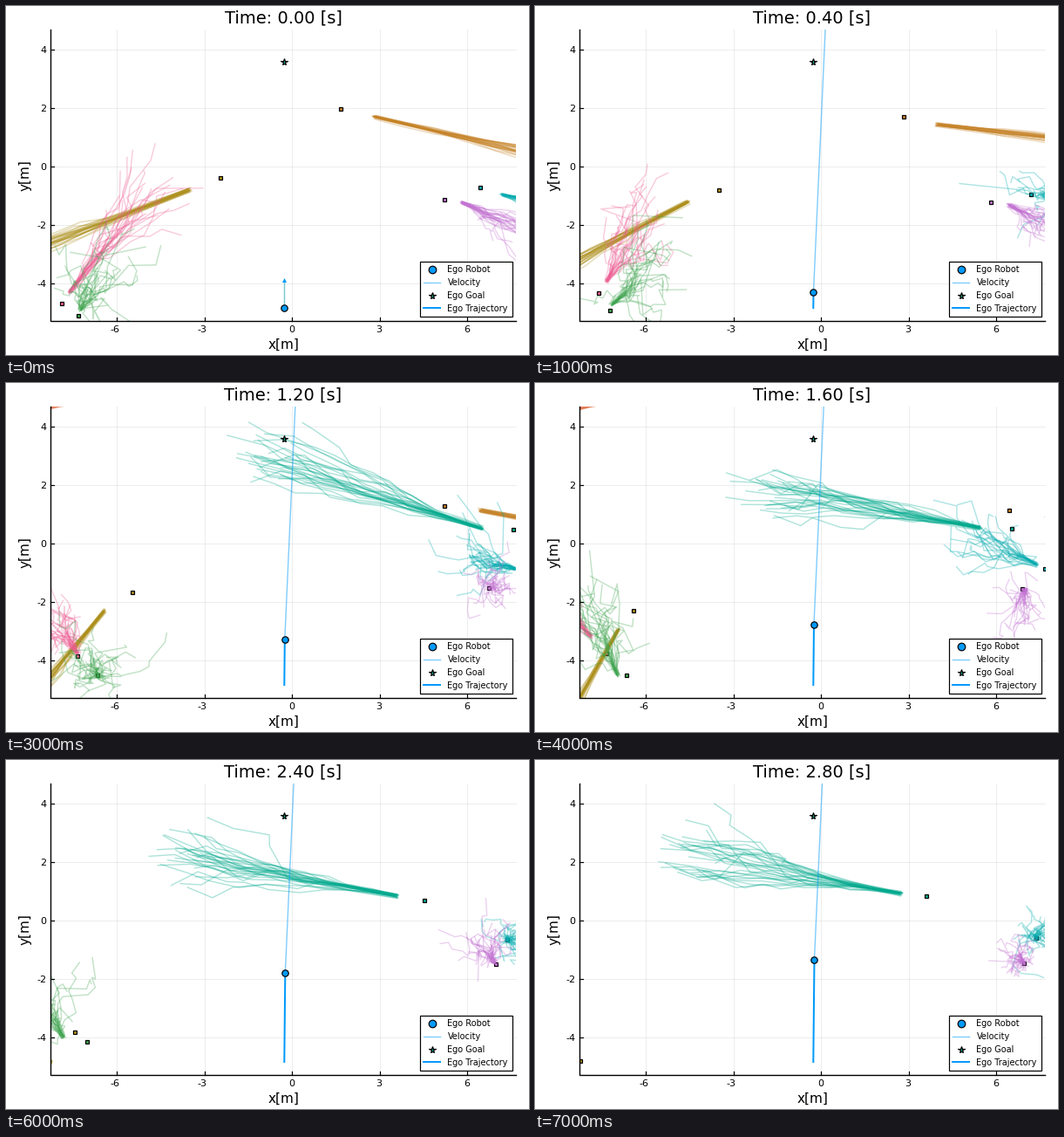
Write a matplotlib script that moves like this. It is 600 px wide and 400 px high and loops after 8000 ms.

```python
import numpy as np
import matplotlib.pyplot as plt
from matplotlib.animation import FuncAnimation
from matplotlib.collections import LineCollection
from matplotlib.patches import Rectangle

plt.rcParams["font.family"] = "DejaVu Sans"

W, H = 600, 400
LEFT, TOP, RIGHT, BOTTOM = 51, 27, 585, 361
SCALE = 33.5  # pixels per metre
STEPS = 8
HORIZON = 8   # how many steps ahead a cruising agent is predicted
KNOTS = 10
PX = 0.72     # points per pixel

BLUE, SALMON, GREEN, PURPLE = "#009afa", "#e36f47", "#3ea44e", "#c371d2"
OLIVE, CYAN, PINK, BROWN, TEAL = "#ac8e18", "#00aaae", "#ed5e93", "#c68225", "#00a98d"

rng = np.random.default_rng(7)
fig = plt.figure(figsize=(W / 100, H / 100), dpi=100, facecolor="white")
ax = fig.add_axes([0, 0, 1, 1])
ax.set_xlim(0, W)
ax.set_ylim(H, 0)
ax.axis("off")

window = Rectangle((LEFT, TOP), RIGHT - LEFT, BOTTOM - TOP, fc="none", ec="none")
ax.add_patch(window)
scenes = [[] for _ in range(STEPS)]


def line(xs, ys, color, width, z=1, **kw):
    return ax.plot(xs, ys, color=color, lw=width * PX, zorder=z, **kw)[0]


def label(x, y, text, size, ha="center"):
    return ax.text(x, y, text, size=size, ha=ha, va="baseline", zorder=12)


def marker(x, y, shape, size, face, z):
    return ax.plot([x], [y], shape, ms=size * PX, mfc=face, mec="black",
                   mew=1.2 * PX, zorder=z)[0]


def put(step, artist):
    """Show an artist inside the plot window during one step only."""
    artist.set_clip_path(window)
    artist.set_visible(False)
    scenes[step].append(artist)


def glide(keys, k):
    """Linear motion between points keyed by step."""
    times = sorted(keys)
    return np.array([np.interp(k, times, [keys[t][i] for t in times]) for i in (0, 1)])


def fan(step, color, root, reach, spread, count):
    """Predicted paths: a straight mean course with a growing random spread."""
    t = np.linspace(0, 1, KNOTS)[:, None]
    power = 1 + min(np.hypot(*reach) / 200, 1)
    start = rng.normal(size=(count, 1, 2)) * 1.2
    drift = rng.standard_t(5, size=(count, 1, 2)) * 0.5 * spread * t ** power
    walk = np.cumsum(rng.standard_t(5, size=(count, KNOTS, 2)) * 0.3 * spread * t, axis=1)
    paths = root + reach * t + start + drift + walk
    lines = LineCollection(paths, colors=color, linewidths=1.4 * PX, alpha=0.32, zorder=4)
    ax.add_collection(lines, autolim=False)
    put(step, lines)


def agent(color, track, spread, aim=None, count=26):
    """A square on its track; predictions start at its next position."""
    for k in range(min(track), min(max(track), STEPS)):
        root = glide(track, k + 1)
        reach = glide(aim, k) if aim else HORIZON * (glide(track, k + 2) - root)
        put(k, marker(*glide(track, k), "s", 4.4, color, 3))
        fan(k, color, root, reach, spread, count)


def draw_axes():
    for v in range(-6, 7, 3):
        x = 328 + SCALE * v
        line([x, x], [TOP, BOTTOM], "black", 0.7, alpha=0.1)
        line([x, x], [BOTTOM, BOTTOM - 4], "black", 1.2, 6)
        label(x - (2.5 if v < 0 else 0.5), 374, str(v), 8)
    for v in range(-4, 5, 2):
        y = 184 - SCALE * v
        line([LEFT, RIGHT], [y, y], "black", 0.7, alpha=0.1)
        line([LEFT, LEFT + 4], [y, y], "black", 1.2, 6)
        label(46.5, y + 4, str(v), 8, "right")
    line([LEFT, LEFT, RIGHT], [TOP, BOTTOM, BOTTOM], "black", 1.4, 6)
    label(318.5, 392.5, "x[m]", 11)
    ax.text(21.5, 194.5, "y[m]", size=11, rotation=90, ha="center", va="center")


def draw_legend():
    ax.add_patch(Rectangle((475, 293), 106, 63, fc="white", ec="black",
                           lw=1.2 * PX, zorder=10))
    rows = [302 + 14.8 * k for k in range(4)]
    names = ("Ego Robot", "Velocity", "Ego Goal", "Ego Trajectory")
    for k, name in enumerate(names):
        label(506.5, 305 + 15 * k, name, 7, "left")
    marker(489, rows[0], "o", 8.6, BLUE, 11)
    line([479, 498], [rows[1]] * 2, BLUE, 1.4, 11, alpha=0.5)
    marker(489, rows[2], "*", 8, TEAL, 11)
    line([479, 498], [rows[3]] * 2, BLUE, 2, 11)


def draw_ego():
    k = np.arange(STEPS)
    xs = 319.3 + 0.17 * k
    ys = 346 - 17.9 * k + 0.16 * k ** 2
    put(0, line([xs[0]] * 2, [ys[0], 314], "#54b9c4", 1.4, 7, alpha=0.8))
    put(0, ax.plot([xs[0]], [314], "^", ms=5 * PX, color=BLUE, mew=0, zorder=7)[0])
    for step, (x, y) in enumerate(zip(xs, ys)):
        if step:
            put(step, line([x, x + 0.045 * (y - TOP)], [y, TOP], BLUE, 1.4, 7, alpha=0.5))
            put(step, line(xs[:step + 1], ys[:step + 1], BLUE, 2, 8))
        put(step, marker(x, y, "o", 7.4, BLUE, 9))
    marker(319, 64, "*", 8, TEAL, 8)


def draw_agents():
    agent(BROWN, {0: (384, 118), 2: (461, 136), 4: (544, 146), 7: (673, 170)}, 11)
    agent(OLIVE, {0: (246, 197), 2: (176, 224), 3: (145, 240), 4: (113, 261),
                  5: (96, 282), 6: (79, 312), 7: (52, 345), 9: (0, 410)}, 13)
    agent(PINK, {0: (64, 341), 2: (82, 316), 4: (82, 310), 5: (65, 291), 6: (40, 270)},
          26, {0: (88, -110), 2: (0, -24), 4: (-67, -68)})
    agent(GREEN, {0: (83, 355), 2: (88, 342), 3: (105, 335), 4: (105, 335),
                  5: (95, 335), 6: (93, 323), 7: (66, 318)},
          32, {0: (18, -46), 2: (97, -39), 3: (-8, -4), 4: (-37, -85),
               5: (37, -130), 6: (-36, -68)})
    agent(CYAN, {0: (544, 208), 1: (569, 216), 2: (592, 216), 4: (585, 213),
                 5: (576, 208), 8: (574, 202)},
          23, {0: (110, 26), 1: (-10, -2), 2: (-42, 4), 4: (-76, -38),
               5: (18, -3), 7: (4, 0)})
    agent(PURPLE, {0: (503, 222), 2: (543, 228), 3: (554, 235), 5: (563, 236),
                   8: (560, 231)},
          19, {0: (84, 32), 2: (37, 29), 3: (3, -9), 4: (-9, 24),
               5: (-22, -46), 7: (-9, -8)})
    agent(TEAL, {3: (582, 168), 5: (511, 166), 7: (449, 156), 8: (420, 153)},
          22, {3: (-251, -80), 4: (-250, -49), 7: (-250, -42)}, 29)
    agent(SALMON, {2: (10, 38), 6: (60, 27)},
          26, {2: (185, -5), 3: (190, -50), 4: (240, -60), 5: (330, -10)}, 14)


draw_axes()
draw_legend()
draw_agents()
draw_ego()
title = label(318, 19.5, "", 14)


def update(step):
    for k, scene in enumerate(scenes):
        for artist in scene:
            artist.set_visible(k == step)
    title.set_text(f"Time: {0.4 * step:.2f} [s]")


anim = FuncAnimation(fig, update, frames=STEPS, interval=1000,
                     repeat=True, repeat_delay=0, blit=False)
plt.show()
```
